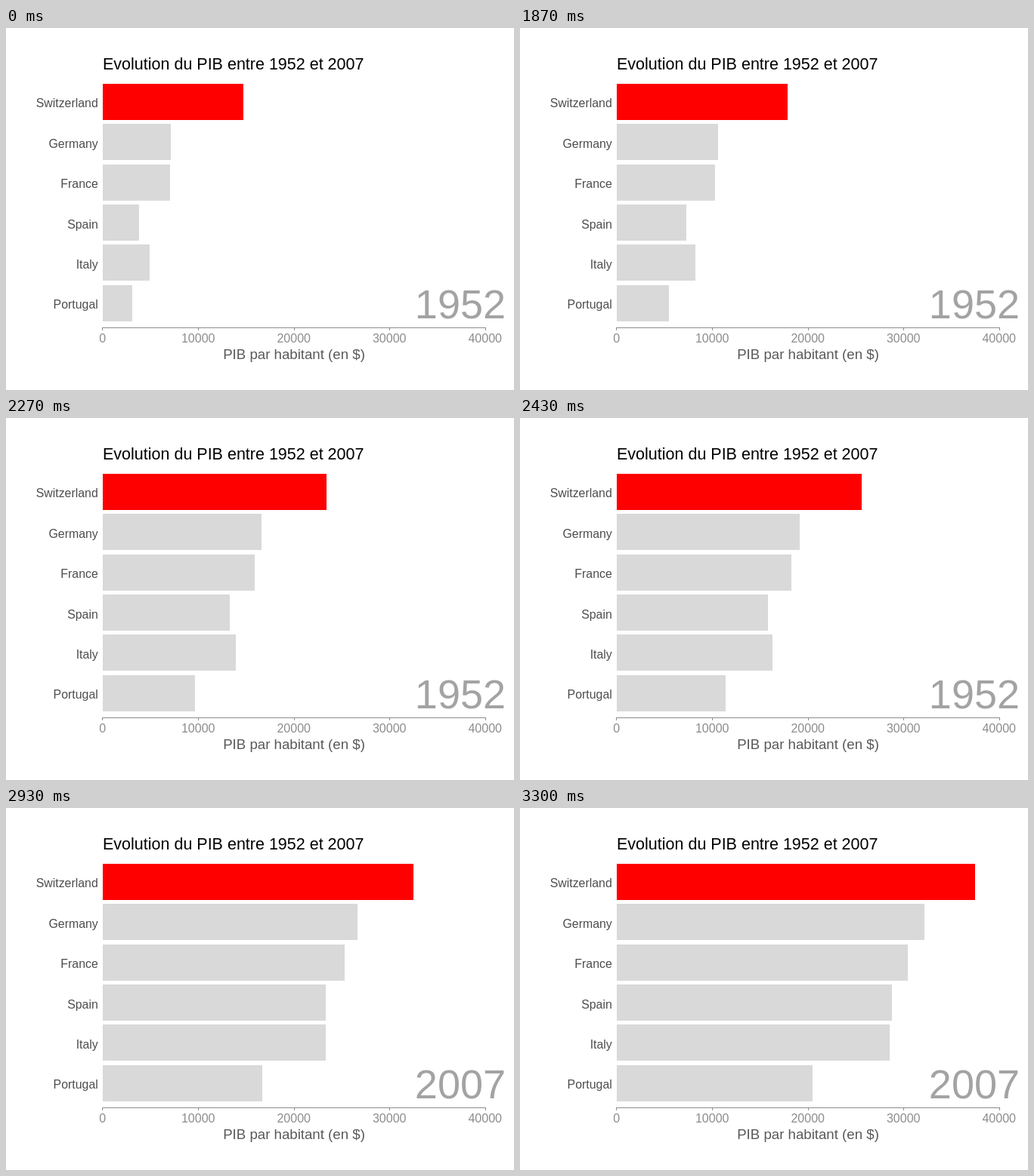
An HTML page for the animation above (5 s loop, 672 by 480 pixels).

```html
<!DOCTYPE html>
<html lang="fr">
<head>
<meta charset="utf-8">
<title>Evolution du PIB</title>
<style>
  html, body { margin: 0; width: 100%; height: 100%; overflow: hidden; background: #fff; }
  svg { display: block; width: 672px; height: 480px; }
  text { font-family: "Liberation Sans", Arial, sans-serif; font-kerning: none; }
</style>
</head>
<body>
<svg id="chart" viewBox="0 0 672 480"></svg>
<script>
const NS = "http://www.w3.org/2000/svg";
const chart = document.getElementById("chart");
const LOOP = 5000, STEPS = 50, HOLD = 49;
const LEFT = 128, ORIGIN = 127.7, SCALE = 0.01265;

// country, GDP per head in 1952 and in 2007
const rows = [
  ["Switzerland", 14734.2, 37506.4],
  ["Germany", 7144.1, 32170.4],
  ["France", 7029.8, 30470],
  ["Spain", 3834, 28821.1],
  ["Italy", 4931.4, 28569.7],
  ["Portugal", 3068.3, 20509.6]
];

function add(tag, attrs, content = "") {
  const el = document.createElementNS(NS, tag);
  for (const key in attrs) el.setAttribute(key, attrs[key]);
  el.textContent = content;
  return chart.appendChild(el);
}

function label(content, x, y, size, fill, anchor) {
  return add("text", { x, y, "font-size": size, fill, "text-anchor": anchor }, content);
}

const px = value => Math.round(ORIGIN + value * SCALE);

label("Evolution du PIB entre 1952 et 2007", 128, 55, 21.5, "#000", "start");

const bars = rows.map(([name], i) => {
  label(name, 121.8, Math.round(105.4 + 53.4 * i), 15.9, "#4d4d4d", "end");
  return add("rect", {
    x: LEFT, y: Math.round(73.9 + 53.35 * i), height: 48,
    fill: i ? "#d9d9d9" : "#f00"
  });
});

add("rect", { x: LEFT, y: 397, width: 506, height: 1, fill: "#8c8c8c" });
for (let v = 0; v <= 40000; v += 10000) {
  add("rect", { x: px(v) - (v ? 0 : 1), y: 397, width: 1, height: 4, fill: "#8c8c8c" });
  label(String(v), ORIGIN + v * SCALE, 417, 16, "#8c8c8c", "middle");
}
label("PIB par habitant (en $)", 381, 439, 18.67, "#595959", "middle");
const year = label("1952", 661, 385, 54, "#a3a3a3", "end");

function draw(ms) {
  // 30 steps per second, on a 10 ms clock
  const tick = Math.floor((Math.floor(ms / 10) * 10 + 5) * 0.03);
  const p = Math.min(Math.max((tick - HOLD) / STEPS, 0), 1);
  rows.forEach(([, from, to], i) => {
    bars[i].setAttribute("width", px(from + (to - from) * p) - LEFT);
  });
  year.textContent = p < 0.5 ? "1952" : "2007";
}

const start = performance.now();
function loop() {
  draw((performance.now() - start) % LOOP);
  requestAnimationFrame(loop);
}
draw(0);
requestAnimationFrame(loop);
</script>
</body>
</html>
```
